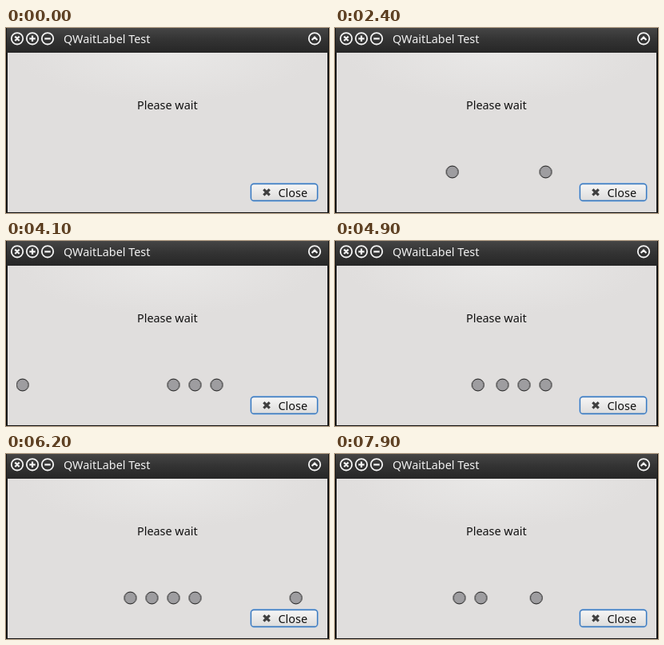
Animation, 404 px wide and 232 px high, one loop 8000 ms. Source, as an HTML page:

```html
<!DOCTYPE html>
<html lang="en">
<head>
<meta charset="utf-8">
<title>QWaitLabel Test</title>
<style>
  html, body { margin: 0; width: 100%; height: 100%; overflow: hidden; background: #141414; }
  svg { display: block; width: 404px; height: 232px; }
  text { font: 14.4px "Noto Sans", "Open Sans", sans-serif; fill: #111; }
  .title { fill: #f2f2f2; }
  .control { fill: none; stroke: #f4f4f4; stroke-width: 1.8; }
  .dot { fill: #9e9da0; stroke: #141414; stroke-width: 1; animation: 8s linear infinite; }

  /* Dots roll in one after another at a steady speed, rest in a row, then roll out. */
  @keyframes dot1 {
    0%, 4.6% { transform: translateX(4.5px); }
    20.99%, 71.24% { transform: translateX(263.5px); }
    79.53%, 100% { transform: translateX(394.5px); }
  }
  @keyframes dot2 {
    0%, 21.01% { transform: translateX(4.5px); }
    35.7%, 82.375% { transform: translateX(236.5px); }
    92.375%, 100% { transform: translateX(394.5px); }
  }
  @keyframes dot3 {
    0%, 36.3% { transform: translateX(4.5px); }
    49.275%, 96.09% { transform: translateX(209.5px); }
    100% { transform: translateX(271.3px); }
  }
  @keyframes dot4 {
    0%, 50.24% { transform: translateX(4.5px); }
    61.5%, 100% { transform: translateX(182.5px); }
  }
  @keyframes dot5 {
    0%, 61.61% { transform: translateX(4.5px); }
    71.175%, 100% { transform: translateX(155.5px); }
  }
</style>
</head>
<body>
<svg viewBox="0 0 404 232">
  <defs>
    <linearGradient id="bar" x1="0" y1="0" x2="0" y2="1">
      <stop offset="0" stop-color="#454545"/>
      <stop offset=".45" stop-color="#343434"/>
      <stop offset="1" stop-color="#262626"/>
    </linearGradient>
    <radialGradient id="glow" gradientUnits="userSpaceOnUse" cx="0" cy="0" r="1"
      gradientTransform="translate(202 31) scale(190 62)">
      <stop offset="0" stop-color="#e9e8e7"/>
      <stop offset="1" stop-color="#e0dedd"/>
    </radialGradient>
    <linearGradient id="face" x1="0" y1="0" x2="0" y2="1">
      <stop offset="0" stop-color="#f6f6f6"/>
      <stop offset="1" stop-color="#dedddc"/>
    </linearGradient>
    <clipPath id="label"><rect x="13" y="165" width="371" height="32"/></clipPath>
  </defs>

  <rect width="404" height="232" fill="#141414"/>
  <rect x="1" width="402" height="31" fill="url(#bar)"/>
  <rect x="2" y="31" width="400" height="200" fill="url(#glow)"/>

  <g class="control">
    <circle cx="14" cy="13.3" r="7.2"/>
    <circle cx="33" cy="13.3" r="7.2"/>
    <circle cx="52" cy="13.3" r="7.2"/>
    <circle cx="386" cy="13.3" r="7.2"/>
    <path stroke-width="2.2" d="M11.3 10.6l5.4 5.4m0-5.4l-5.4 5.4M29.3 13.3h7.4M33 9.6v7.4M48.3 13.3h7.4M382.6 15l3.4-3.4 3.4 3.4"/>
  </g>
  <text class="title" x="72" y="19">QWaitLabel Test</text>
  <text x="164" y="102">Please wait</text>

  <g clip-path="url(#label)">
    <circle class="dot" cy="180.5" r="7.5" style="animation-name: dot1"/>
    <circle class="dot" cy="180.5" r="7.5" style="animation-name: dot2"/>
    <circle class="dot" cy="180.5" r="7.5" style="animation-name: dot3"/>
    <circle class="dot" cy="180.5" r="7.5" style="animation-name: dot4"/>
    <circle class="dot" cy="180.5" r="7.5" style="animation-name: dot5"/>
  </g>

  <rect x="305.5" y="194.5" width="85" height="23" rx="4.5" fill="none" stroke="#a9c6e6"/>
  <rect x="306.5" y="195.5" width="83" height="21" rx="3.5" fill="url(#face)" stroke="#3a78bd" stroke-width="1.3"/>
  <path d="M322.3 202.3l7.4 7.4m0-7.4l-7.4 7.4" stroke="#3f3f3f" stroke-width="3.2"/>
  <text x="340.5" y="212">Close</text>
</svg>
</body>
</html>
```
